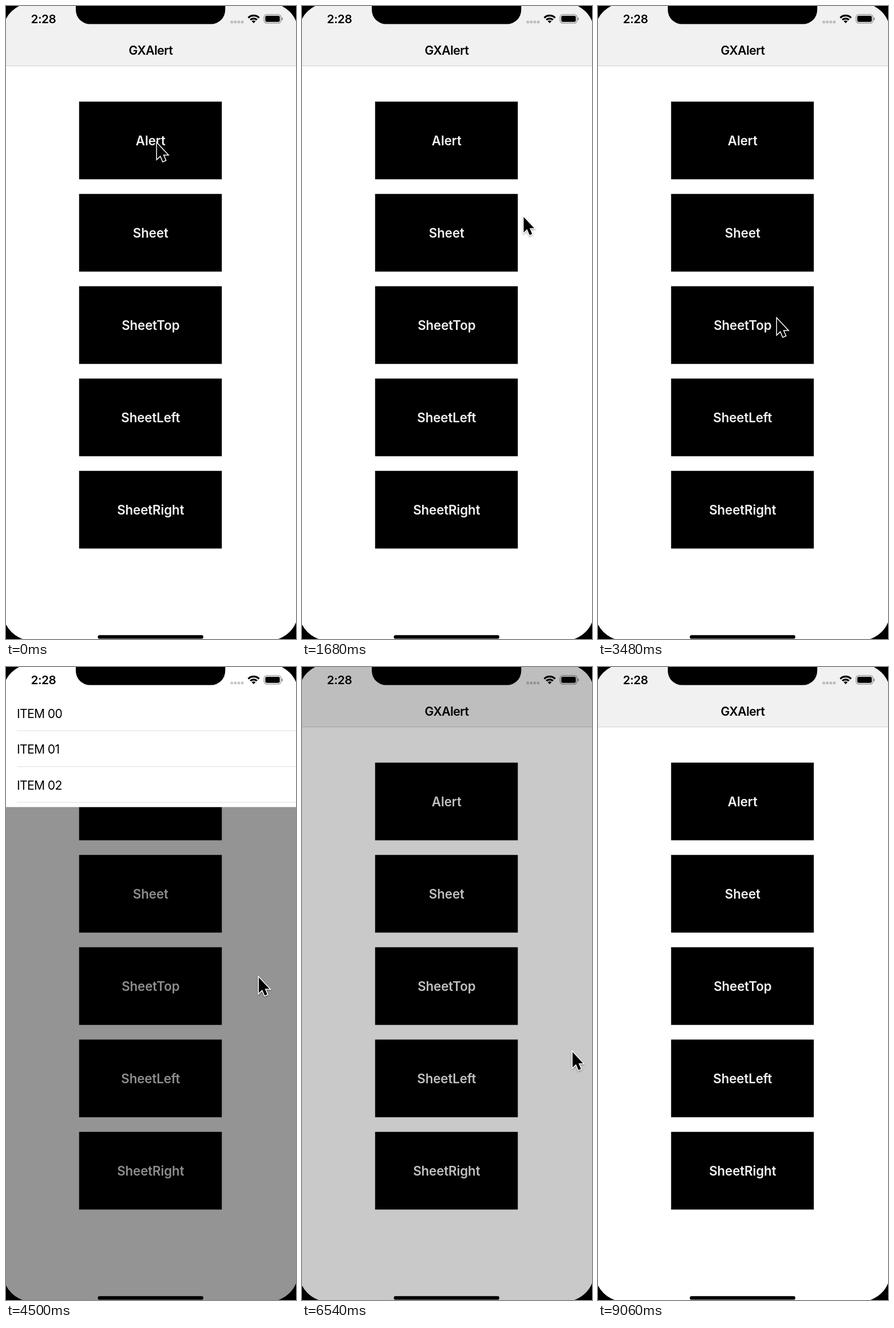
An HTML page with a canvas for the animation above (9360 ms loop, 507x1104 px).

```html
<!DOCTYPE html>
<html lang="en">
<head>
<meta charset="utf-8">
<title>GXAlert</title>
<style>
  html, body { margin: 0; width: 507px; height: 1104px; overflow: hidden; background: #000; }
  canvas { display: block; }
</style>
</head>
<body>
<canvas id="stage" width="507" height="1104"></canvas>
<script>
const ctx = document.getElementById('stage').getContext('2d');
const LOOP = 9360, STEP = 60;
const PT = 1.248, ROW = 50 * PT, PANEL = 200 * PT;
const SCREEN = { x: -5.8, y: -5.3, w: 516.8, h: 1111.9 };
const BUTTONS = ['Alert', 'Sheet', 'SheetTop', 'SheetLeft', 'SheetRight'];

// dx, dy: offset while hidden; rowsY: top of the first row; tableH: white part
const PANELS = [
  { open: 0, close: 1200, x: 65.5, y: 460.3, w: 374, h: 3 * ROW, fade: true },
  { open: 2100, close: 3060, x: SCREEN.x, y: 857, w: SCREEN.w, h: PANEL, dy: PANEL, inset: 25 },
  { open: 3780, close: 4680, x: SCREEN.x, y: SCREEN.y, w: SCREEN.w, h: PANEL, dy: -PANEL, inset: 25, rowsY: 54.7 },
  { open: 5280, close: 6420, x: SCREEN.x, y: SCREEN.y, w: PANEL, h: SCREEN.h, dx: -PANEL, rowsY: 54.7, tableH: 414 * PT },
  { open: 7140, close: 8160, x: 261.4, y: SCREEN.y, w: PANEL, h: SCREEN.h, dx: PANEL, rowsY: 54.7, tableH: 414 * PT }
];

// Pointer stops: time, x, y
const POINTER = [
  [0, 263, 238], [240, 263, 238], [1020, 455, 331], [1380, 455, 331],
  [2040, 296.5, 413], [2400, 296.5, 413], [2880, 432, 470], [3120, 432, 470],
  [3660, 270, 570], [3960, 270, 570], [4500, 441, 540], [4740, 441, 540],
  [5160, 274, 728], [5460, 274, 728], [6240, 472, 670], [6540, 472, 670],
  [6960, 274, 890], [7260, 274, 890], [7740, 79, 751], [8100, 53, 742],
  [8520, 53, 742], [9060, 230, 1130], [LOOP, 230, 1130]
];

const progress = (t, start, length) => Math.min(1, Math.max(0, (t - start) / length));
const smooth = k => k * k * (3 - 2 * k);

function box(x, y, w, h, color, radius = 0) {
  ctx.fillStyle = color;
  ctx.beginPath();
  ctx.roundRect(x, y, w, h, radius);
  ctx.fill();
}

function label(text, x, baseline, size, weight, color, align, spacing) {
  ctx.font = `${weight} ${size}px Inter, sans-serif`;
  ctx.letterSpacing = spacing + 'px';
  ctx.textAlign = align;
  ctx.fillStyle = color;
  ctx.fillText(text, x, baseline);
}

function drawPage() {
  box(0, 0, 507, 1104, '#fff');
  box(0, 0, 507, 104, '#f1f1f1');
  box(0, 104, 507, 1, '#cfcfcf');
  label('GXAlert', 253, 84.5, 21.2, 600, '#000', 'center', -0.5);
  BUTTONS.forEach((name, i) => {
    const y = 166.7 + i * 161;
    box(127.8, y, 249.5, 135.6, '#000');
    label(name, 252.8, y + 76, 22.3, 600, '#f3f3f3', 'center', -0.1);
  });
}

function drawPanel(panel, t) {
  const { open, close, x, y, w, h, dx = 0, dy = 0, inset = 20, rowsY = 0, tableH = h, fade } = panel;
  const shown = 1 - (1 - progress(t, open, 240)) ** 3;
  const gone = progress(t, close, 110);
  const dim = 0.42 * shown * (1 - progress(t, close + 30, 180));
  box(0, 0, 507, 1104, `rgba(0,0,0,${dim})`);
  if (gone === 1) return;

  const hidden = 1 - shown * (1 - gone);
  ctx.save();
  if (fade) ctx.globalAlpha = 1 - hidden;
  ctx.translate(x + dx * hidden, y + dy * hidden);
  box(0, 0, w, h, '#a2a2a2');
  box(0, 0, w, tableH, '#fff');
  ctx.beginPath();
  ctx.rect(0, 0, w, tableH);
  ctx.clip();
  for (let i = 0, top = rowsY; top < tableH - 1; i++, top += ROW) {
    label('ITEM 0' + i, inset - 0.3, top + 39.3, 21.2, 400, '#000', 'left', -0.65);
    box(inset, top + ROW - 1, w, 1, '#dedede');
  }
  ctx.restore();
}

function drawStatusBar() {
  label('2:28', 43.6, 30, 20.7, 600, '#000', 'left', -0.5);
  for (let i = 0; i < 4; i++) box(392.4 + i * 6.1, 25.6, 4.7, 4.7, 'rgba(0,0,0,.22)', 1.5);

  const wifi = (radius, width) => {
    ctx.lineWidth = width;
    ctx.beginPath();
    ctx.arc(433, 30, radius, -Math.PI * 0.75, -Math.PI * 0.25);
    ctx.stroke();
  };
  ctx.strokeStyle = '#000';
  wifi(2.4, 4.8);
  wifi(8.2, 3.2);
  wifi(13.4, 3.2);

  ctx.strokeStyle = 'rgba(0,0,0,.42)';
  ctx.lineWidth = 1.3;
  ctx.beginPath();
  ctx.roundRect(451.2, 14.8, 29.6, 15, 4.5);
  ctx.stroke();
  box(453.3, 16.9, 25.4, 10.8, '#000', 2.6);
  box(482, 20, 1.7, 5, 'rgba(0,0,0,.45)', 1);
}

function drawBezel() {
  box(160.5, 1097.3, 184.5, 6.2, '#000', 3.1);
  box(122, -30, 261.3, 61.6, '#000', 25);
  ctx.beginPath();
  ctx.rect(-10, -10, 530, 1130);
  ctx.roundRect(SCREEN.x, SCREEN.y, SCREEN.w, SCREEN.h, 51.6);
  ctx.fill('evenodd');
}

const arrow = new Path2D('M1 1.5V28.5L7 22.8L11.4 33L15.8 31L11.5 21.2H19.5Z');

function drawPointer(t) {
  const i = POINTER.findIndex(stop => stop[0] > t);
  const [t0, x0, y0] = POINTER[i - 1], [t1, x1, y1] = POINTER[i];
  const k = smooth((t - t0) / (t1 - t0));
  ctx.save();
  ctx.translate(x0 + (x1 - x0) * k, y0 + (y1 - y0) * k);
  ctx.strokeStyle = '#fff';
  ctx.lineWidth = 3;
  ctx.shadowColor = 'rgba(0,0,0,.35)';
  ctx.shadowBlur = 3;
  ctx.shadowOffsetY = 1.5;
  ctx.stroke(arrow);
  ctx.shadowColor = 'transparent';
  ctx.fillStyle = '#000';
  ctx.fill(arrow);
  ctx.restore();
}

function render(now) {
  const t = Math.floor((now % LOOP) / STEP) * STEP;
  drawPage();
  const panel = PANELS.find(p => t > p.open && t < p.close + 210);
  if (panel) drawPanel(panel, t);
  drawStatusBar();
  drawBezel();
  drawPointer(t);
}

const start = performance.now();
function tick() {
  render(performance.now() - start);
  requestAnimationFrame(tick);
}
tick();
</script>
</body>
</html>
```
